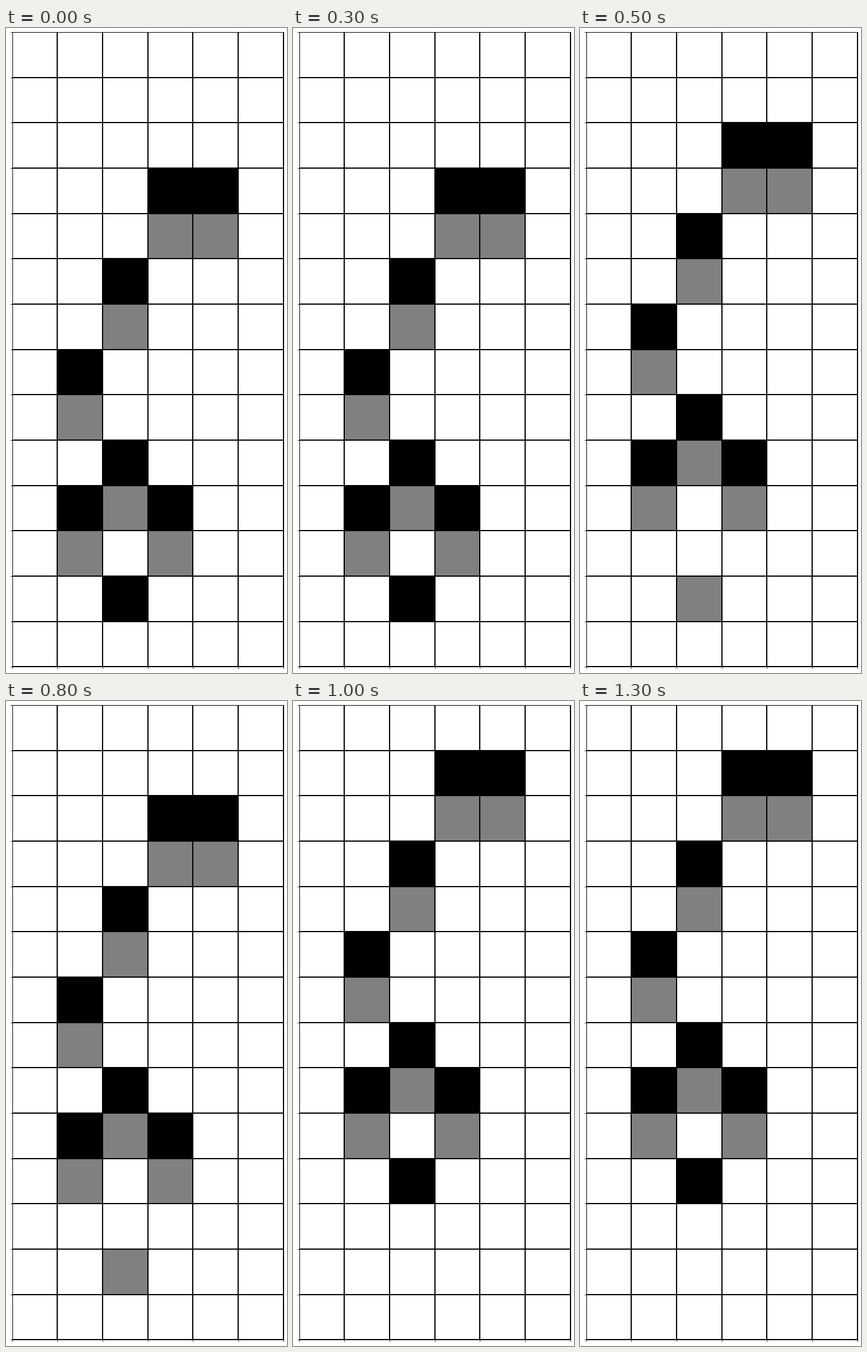
Animation of 483 by 1105 pixels, one loop 1500 ms. Source, as an HTML page with a canvas:

```html
<!DOCTYPE html>
<html lang="en">
<head>
<meta charset="utf-8">
<title>Climbing cells</title>
<style>
  html, body { margin: 0; width: 483px; height: 1105px; overflow: hidden; background: #fff; }
  canvas { display: block; }
</style>
</head>
<body>
<canvas id="stage" width="483" height="1105"></canvas>
<script>
const ctx = document.getElementById('stage').getContext('2d');
const COLS = 6, ROWS = 14, PITCH = 77.64;
const STEP_MS = 500, STEPS = 3;
const BLACK = '#000', GREY = '#808080', TICK = '#333';

const colX = col => Math.round(10.8 + col * PITCH);
const rowY = row => Math.round(7.2 + row * PITCH);

// [column, row] at the first step; each cell climbs one row per step.
const climbers = [[3, 3], [4, 3], [2, 5], [1, 7], [2, 9], [1, 10], [3, 10]];
// The lowest cell fades in place before it reappears two rows higher.
const blinker = [[12, BLACK], [12, GREY], [10, BLACK]];

function fill(color, x, y, w, h) {
  ctx.fillStyle = color;
  ctx.fillRect(x, y, w, h);
}

function drawCell(col, row, color) {
  const x = colX(col), y = rowY(row);
  fill(color, x, y, colX(col + 1) - x, rowY(row + 1) - y);
}

function drawGrid() {
  const left = colX(0), right = colX(COLS) + 1;
  const top = rowY(0), bottom = rowY(ROWS) + 1;
  for (let col = 0; col <= COLS; col++) {
    const x = colX(col);
    fill(TICK, x, bottom, 1, 3);
    fill(BLACK, Math.max(left, x - 1), top, col ? 2 : 1, bottom - top);
  }
  for (let row = 0; row <= ROWS; row++) {
    const y = rowY(row);
    fill(TICK, left - 3, y, 3, 1);
    fill(BLACK, left, Math.max(top, y - 1), right - left, row ? 2 : 1);
  }
}

function draw(step) {
  fill('#fff', 0, 0, 483, 1105);
  for (const [col, row] of climbers) {
    drawCell(col, row - step, BLACK);
    drawCell(col, row - step + 1, GREY);
  }
  drawCell(2, ...blinker[step]);
  drawGrid();
}

function tick() {
  draw(Math.floor(performance.now() / STEP_MS) % STEPS);
  requestAnimationFrame(tick);
}
tick();
</script>
</body>
</html>
```
